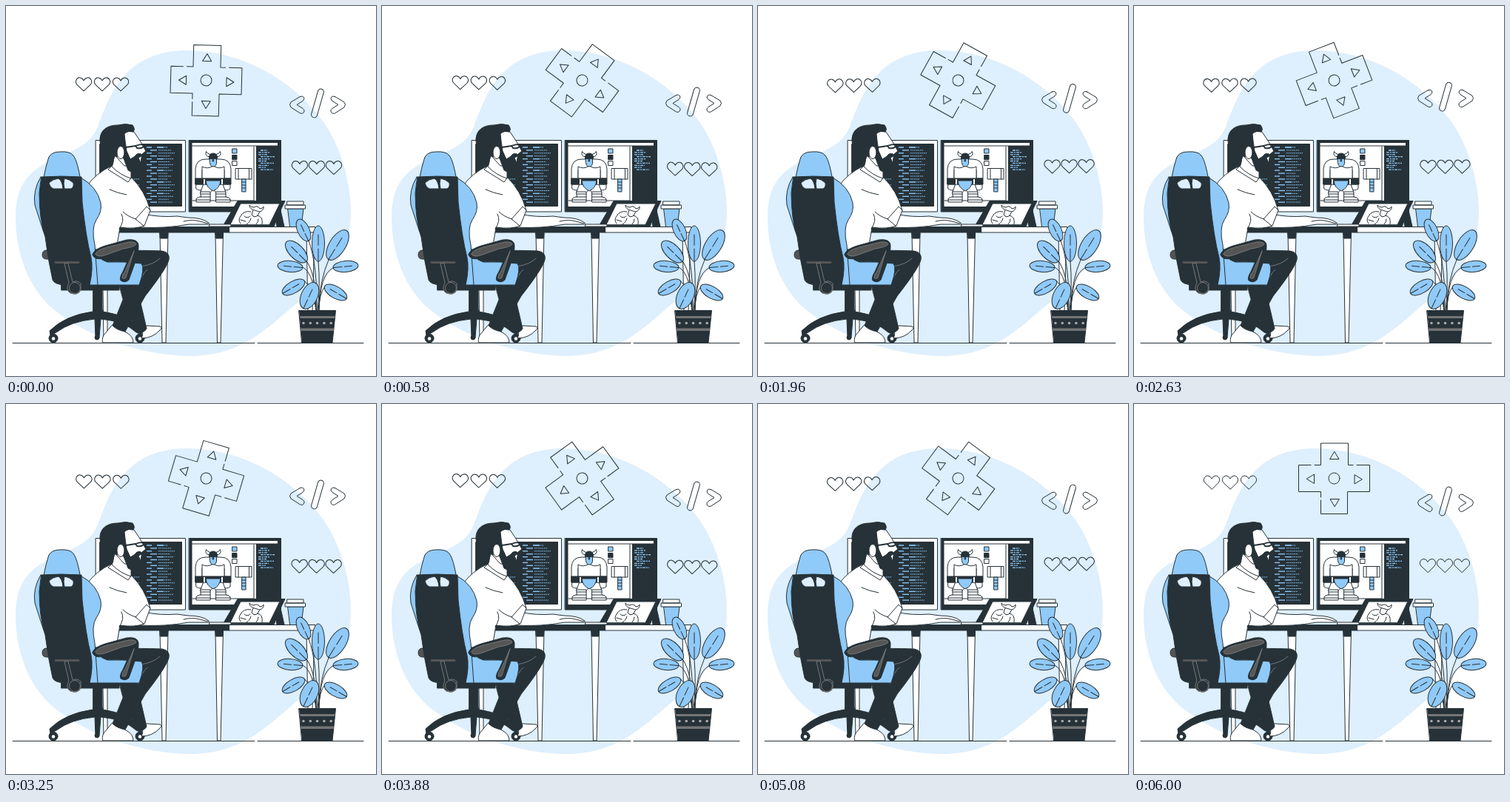
Write an HTML page that moves like this. It is 500 px wide and 500 px high and loops after 6040 ms.

```html
<!DOCTYPE html>
<html lang="en">
<head>
<meta charset="utf-8">
<title>Game developer at work</title>
<style>
  html, body { margin: 0; height: 100%; overflow: hidden; background: #fff; }
  svg { display: block; width: 100vw; height: 100vh; fill: #fff; stroke: #263238; stroke-width: 1; stroke-linejoin: round; stroke-linecap: round; }
  .dark { fill: #263238; }
  .blue { fill: #90caf9; }
  .pale { fill: #deeffd; }
  .grey { fill: #555; }
  .line { fill: none; }
  .flat { stroke: none; }
  .soft { stroke: #777; }
  .code { fill: none; stroke: #90caf9; stroke-width: 1.3; stroke-linecap: butt; }
</style>
</head>
<body>
<svg viewBox="0 0 500 500">
  <defs>
    <path id="heart" d="M0 9L-9 .5C-13-4-9-9.5-5-9Q-1.500-8.500 0-5Q1.500-8.500 5-9C9-9.500 13-4 9 .5Z"/>
    <path id="chevron" d="M397.500 122.500L385 130Q382 133 385 137L397.500 145Q401 147 403 143Q403.500 140 401 138.500L393 133.500 401 128.500Q404 126 402.500 123.500Q400.500 121 397.500 122.500Z"/>
    <g id="viking">
      <path d="M256 233V220Q257 207 270 207H290Q303 207 304 220V233H295V222H265V233Z"/>
      <path d="M265 233V217Q272 221 280 216Q288 221 295 217V233Z"/>
      <path d="M257 241h10v6q-5 4-10 0zM293 241h10v6q-5 4-10 0z"/>
      <path d="M267 241H293L297 252H284L280 248 276 252H263Z"/>
      <path class="dark" d="M256 233H304V241H256Z"/>
      <path class="flat" d="M267 234h2v7h-2zM291 234h2v7h-2z"/>
      <path class="blue" d="M270 236H290Q289 246 280 250Q271 246 270 236Z"/>
      <path d="M263 251H276V265H257V261Q258 258 263 258ZM284 251H297V258Q302 258 303 261V265H284Z"/>
      <path class="line" d="M263 254H276M263 258H276M257 262H276M284 254H297M284 258H297M284 262H303"/>
      <path class="blue" d="M275.500 206H284.500V212Q284 217 280 217Q276 217 275.500 212Z"/>
      <path d="M275 204Q268 203 270.500 196.500Q272 200 276 200.500ZM285 204Q292 203 289.500 196.500Q288 200 284 200.500Z"/>
      <path class="dark" d="M274.500 206Q274 199 280 199Q286 199 285.500 206ZM279.500 206h1v4h-1z"/>
    </g>
  </defs>

  <path class="flat pale" d="M240 60C325 59 394 107 430 158C456 196 470 253 465 296C459 343 429 373 389 405C352 436 318 473 248 473C190 472 118 452 67 412C29 382 13 331 13 286C13 247 27 226 56 211C88 195 113 191 124 163C139 126 156 63 240 60Z"/>
  <path d="M9 455.500H336M340 455.500H483"/>

  <!-- Floating controls -->
  <g id="pad" class="line">
    <path d="M239 82.500H222.500V118.500H252.500V126M252.500 130V148.500H288.500V118.500H318.500V82.500H301M296 82.500H289.500V53H252.500V82.500H244"/>
    <circle cx="270.500" cy="100.500" r="7.500"/>
    <path d="M271 64.500L277 74.500H265ZM308 102L298 108V96ZM271 138.500L265 128.500H277ZM233.500 101L243.500 95V107Z"/>
  </g>
  <g id="hearts" class="line"></g>
  <g id="tag" class="line">
    <use href="#chevron"/>
    <use href="#chevron" transform="translate(842) scale(-1 1)"/>
    <rect x="417" y="111.500" width="8" height="40" rx="4" transform="rotate(16 421 131.500)"/>
  </g>

  <!-- Monitors -->
  <path d="M121.500 181.500H242.500V278H121.500Z"/>
  <path class="dark" d="M127 186.500H237.500V270.500H127Z"/>
  <g id="listing" class="code"></g>
  <path class="dark" d="M247.500 181.500H371.500V278H247.500Z"/>
  <path class="flat" d="M251.500 185H367V188.500H251.500ZM251.500 189.500H338V271H251.500Z"/>
  <path class="line" d="M335 190V263H252"/>
  <g id="sidebar" class="code"></g>
  <use href="#viking"/>
  <path class="blue" d="M306 193h6v6h-6z"/>
  <path class="dark" d="M306 201.500h6v6h-6z"/>
  <path d="M306 209.500h6v6h-6z"/>
  <path d="M310.500 219.500H332V234H310.500ZM314 219.500V234M328.500 219.500V234"/>
  <path class="blue" d="M319 234h5v17h-5zM319 238h5M319 242h5M319 246h5"/>

  <!-- Desk -->
  <path d="M208 306L211 455H216L219 306ZM283 306L285.500 455H290L293.500 306ZM131 380L132 455H137V380ZM406 306L408 412H414L417 306Z"/>
  <path class="dark" d="M208 306H219L218.500 314H208.500ZM283 306H293.500L293 314H283.500Z"/>
  <path class="dark" d="M146 298.500H302V306H146Z"/>
  <path d="M302 298.500H418V306H302Z"/>

  <!-- Tablet -->
  <path class="dark" d="M293 297.500L313 263.500H377L371 276 376 298H366L365 291 362 298Z"/>
  <path d="M303 295.500L317 267H370L356 295.500Z"/>
  <g class="line">
    <path d="M333 275Q328 272 329 269Q331 272 335 272Q340 269 343 274Q347 274 348 271Q349 276 343 278ZM334 276L332 282Q336 287 340 283L343 278"/>
    <path d="M331 278Q321 276 317 284Q313 289 317 294M322 284Q326 288 330 284M340 283Q348 285 346 295M331 287Q330 292 325 295M341 288Q341 292 338 295M317 289L324 291"/>
  </g>

  <!-- Cup -->
  <path class="blue" d="M381 274H402L399 298.500H384Z"/>
  <path d="M380 264H402V269H380ZM377.500 269H404.500V274H377.500Z"/>

  <!-- Plant -->
  <path class="line" d="M422 345Q425 380 421 412M436 343Q424 370 422 412M409 317Q421 350 420 412M407 346Q420 366 419 412M401 353Q418 362 419 412M442 354Q424 362 423 412M431 379Q423 388 423 412M403 371Q416 382 419 412"/>
  <g id="leaves"></g>
  <path class="dark" d="M396 411.500H445.500L441 455H400Z"/>
  <path class="flat" fill="#757575" d="M397 419H444.500L444 422H397.500ZM398.500 435.500H443L442.500 439H399Z"/>
  <g id="potDots" class="flat" fill="#aaa"></g>

  <!-- Chair base -->
  <path class="dark" d="M75 377H153V384H75ZM118 384H130V412H118Z"/>
  <path class="dark" d="M119 408H129L131 413Q165 418 184 437L183 444 176 441Q160 426 128 423L126 448H121L120 423Q88 426 68 441L60 445 59 439Q80 418 117 413Z"/>
  <g class="dark"><circle cx="64" cy="449" r="6"/><circle cx="123" cy="448" r="3"/><circle cx="181" cy="449" r="6"/></g>
  <g class="flat"><circle cx="64" cy="449.500" r="2.300"/><circle cx="181" cy="449.500" r="2.300"/></g>

  <!-- Legs and seat -->
  <path d="M190 432L208 433Q212 434 208 438Q198 449 183 449Q186 443 184 440Z"/>
  <path d="M144 431L164 442Q172 447 172 455H131Q129 451 132 445Z"/>
  <path class="dark" d="M153 376H176L190 436Q186 443 177 441L158 396Z"/>
  <path class="dark" d="M118 330Q180 330 211 331Q222 333 220 343Q217 355 188 392L161 440Q150 438 144 432L166 377Q173 351 188 348L150 360H118Z"/>
  <path class="line soft" d="M183 352Q200 349 208 341M178 378Q184 362 191 356"/>
  <path class="blue" d="M104 318H116Q121 342 137 346Q160 345 183 348Q188 354 180 377H104Z"/>

  <!-- Body -->
  <path d="M185 281Q209 286 231 284L246 286Q265 286 274 293Q275 296 270 295H247Q215 301 180 299Z"/>
  <path class="line" d="M240 291Q252 288 262 291L273 294"/>
  <path d="M275 295H304V298H275Z"/>
  <path d="M143 216Q122 225 107 246V329H149L154 299Q174 302 187 297L195 276Q188 250 169 231Z"/>
  <path class="line" d="M140 248Q151 253 163 255M156 281Q161 290 153 301M186 297L175 288 190 271 195 276M176 288Q165 285 158 278"/>
  <path d="M145 202Q146 212 143 217Q155 229 169 233V219L158 208Z"/>
  <path class="line" d="M143 216L138 221 165 238 170 231"/>

  <!-- Head -->
  <path d="M158 169L173 170 181 182 189 196 184 200 181 216H160L150 205Z"/>
  <path class="dark" d="M127 183C126 166 139 161 151 161Q162 158 171 161Q175 166 172 170Q164 168 160 173Q161 184 163 196L168 207Q174 204 177 200Q182 198 185 202L179 205Q183 211 181 219Q174 228 165 222L159 206Q151 203 150 192L144 213Q134 207 130 196Z"/>
  <ellipse cx="155" cy="198" rx="5" ry="8.500"/>
  <path class="line" stroke-width="1.800" d="M162 191L175 189Q186 185 186 190Q183 193 177 192L175 189"/>

  <!-- Chair back -->
  <path class="blue" d="M50 237Q54 215 58 204Q62 197 73 197Q86 196 91 202Q97 210 101 237Z"/>
  <path class="blue" d="M47 231Q36 249 39 269L50 303 60 330 55 250Z"/>
  <path class="blue" d="M101 232Q123 244 128 266Q130 278 122 289Q115 300 120 323L124 377H107L99 251Z"/>
  <path class="grey" d="M62 330H54Q49 331 49 336Q49 342 55 342H62Z"/>
  <path class="dark" d="M48 231Q75 229 102 231L103 265Q108 313 115 340Q118 355 113 377H79Q65 376 63 370Q57 344 53 312Q45 288 45 253Z"/>
  <path class="pale" d="M71 233Q76 236 77 247H64Q59 245 58 239Q63 234 71 233ZM79 233Q86 234 91 239Q92 245 88 247H79Q77 240 79 233Z"/>
  <path class="line" stroke-width="3" style="stroke:#555" d="M67 346.500H98"/>
  <path class="dark soft" d="M79 348L85 374Q80 384 87 388Q97 392 101 384V375Q96 370 90 373L84 348Z"/>
  <circle class="dark soft" cx="93" cy="381" r="7.500"/>

  <!-- Armrest -->
  <path class="dark" d="M117 336Q118 329 134 324L163 316Q178 314 179 323Q180 333 175 345L166 370Q161 375 155 371Q153 367 158 359L170 332Q155 334 133 341Q119 344 117 336Z"/>
  <path class="grey soft" d="M121 335Q122 330 137 326L166 319Q175 318 176 322Q172 326 158 328L133 337Q122 340 121 335ZM173 331L162 367Q158 370 157 367Q157 363 161 358Z"/>
</svg>
<script>
  const $ = id => document.getElementById(id);
  const fill = (id, items, draw) => $(id).innerHTML = items.map(draw).join('');
  const range = n => [...Array(n).keys()];

  fill('hearts', [[105, 106], [130, 106], [155, 106], [397, 218.5], [420, 218.5], [443, 218.5]],
    ([x, y]) => `<use href="#heart" x="${x}" y="${y}"/>`);

  // x, y, half width, half length, tilt
  const leaves = [
    [402, 303, 8, 16, -25], [392.5, 332, 9.5, 19, -45], [384, 352, 7.5, 17, -85],
    [388.5, 380, 8, 17, 60], [448, 323, 11, 23, 32], [459, 352, 7.5, 17, 85],
    [445.5, 387, 8, 17, -60], [422, 321, 8.5, 24, 0], [410, 391.5, 11, 19, 25]
  ];
  fill('leaves', leaves, ([x, y, w, h, a]) =>
    `<g transform="translate(${x} ${y}) rotate(${a})"><ellipse class="blue" rx="${w}" ry="${h}"/><path d="M0 ${h}V${h * .3}M0 ${h * .1}V${-h * .5}"/></g>`);

  fill('potDots', range(5), i => `<circle cx="${402 + i * 9.3}" cy="428.500" r="1.800"/>`);

  fill('listing', range(20), i => {
    const y = 191 + i * 3.9;
    const margin = i > 10 ? `M168 ${y}h${8 + i * 5 % 10}` : '';
    return `<path d="M${190 + i % 2 * 5} ${y}h${i % 2 ? 9 : 7}M204 ${y}h${i % 4 ? 0 : 9}"/>` +
      `<path stroke-width="1" stroke-dasharray="1.600 1" d="${margin}M206 ${y}h${12 + i * 5 % 11}"/>`;
  });
  fill('sidebar', range(10), i =>
    `<path stroke-dasharray="4 1 2 1" d="M${341 + (i % 3 ? 0 : 3)} ${195 + i * 2.9}h${9 + i * 7 % 11}"/>`);

  const LOOP = 6040, STEP = 1000 / 24, TURN = 6000;
  const sway = p => p < .25 ? p * 4 : p < .75 ? 2 - p * 4 : p * 4 - 4;
  const start = performance.now();

  function draw(now) {
    const step = Math.floor((Math.max(0, now - start) % LOOP + 4) / STEP);
    const t = Math.min(TURN, step * STEP + 25);
    const rise = 10 * (1 - Math.abs(2 * t / TURN - 1));
    $('pad').setAttribute('transform', `rotate(${t / TURN * 360} 270.500 100.500)`);
    $('hearts').setAttribute('transform', `rotate(${sway(t / 3000 % 1)} 273.500 162)`);
    $('tag').setAttribute('transform', `translate(0 ${-rise})`);
    requestAnimationFrame(draw);
  }
  draw(start);
</script>
</body>
</html>
```
